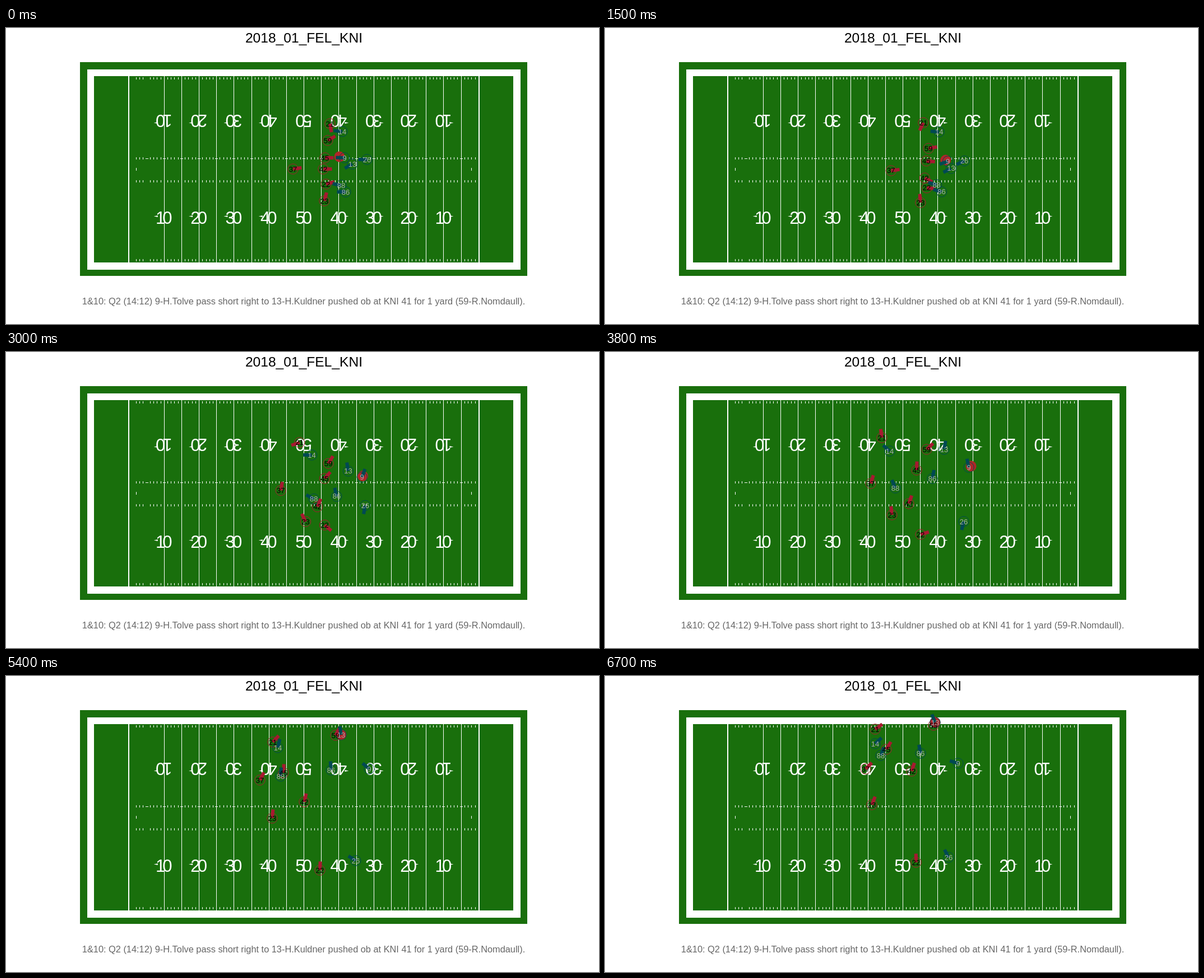
Animation, 1058 px wide and 529 px high, one loop 6800 ms. Source, as an HTML page:

```html
<!DOCTYPE html>
<html lang="en">
<head>
<meta charset="utf-8">
<title>Play diagram</title>
<style>
  html, body { margin: 0; width: 100%; height: 100%; overflow: hidden; background: #fff; }
  svg { display: block; width: 100%; height: 100%; }
  text { font-family: "Liberation Sans", Arial, sans-serif; text-anchor: middle; }
  #title { font-size: 24.6px; }
  #caption { font-size: 16.35px; fill: #666; }
  #field { shape-rendering: crispEdges; }
  #yards { font-size: 31px; fill: #fff; }
  .ring { fill: none; stroke-width: 1; }
  .bar { stroke-width: 6; }
  .num { font-size: 13px; }
  .away { stroke: #a71930; }
  .home { stroke: #004953; }
  .num.away { stroke: none; fill: #000; }
  .num.home { stroke: none; fill: #a5acaf; }
</style>
</head>
<body>
<svg viewBox="0 0 1058 529">
  <text id="title" x="531.5" y="26">2018_01_FEL_KNI</text>
  <g id="field">
    <rect x="132" y="61" width="798" height="382" fill="#196f0c"/>
    <rect x="145" y="74" width="773" height="358" fill="#fff"/>
    <rect x="157" y="86" width="748" height="333" fill="#196f0c"/>
  </g>
  <g id="yards"></g>
  <circle id="ball" r="9.5" fill="#b02628"/>
  <g id="rings"></g>
  <g id="bars"></g>
  <g id="nums"></g>
  <text id="caption" x="531" y="494">1&amp;10: Q2 (14:12) 9-H.Tolve pass short right to 13-H.Kuldner pushed ob at KNI 41 for 1 yard (59-R.Nomdaull).</text>
</svg>
<script>
const LOOP = 6800, STEP = 100;
const YARD = 6.234, MIDFIELD = 531.1;
const byId = id => document.getElementById(id);

function add(parent, tag, attrs, text = '') {
  const el = document.createElementNS('http://www.w3.org/2000/svg', tag);
  for (const key in attrs) el.setAttribute(key, attrs[key]);
  el.textContent = text;
  return byId(parent).appendChild(el);
}

// Field markings
const mark = (x, y, width, height) => add('field', 'rect', { x, y, width, height, fill: '#fff' });
const yardX = yard => MIDFIELD + (yard - 50) * YARD;
const pixelX = yard => Math.round(yardX(yard));

for (let yard = 2; yard < 100; yard++) {
  const x = pixelX(yard);
  if (yard % 5) {
    for (const y of [88, 231, 272, 413]) mark(x, y, 1, 4);
  } else {
    mark(x - 2, 233, 5, 1);
    if (yard > 5) mark(x, 86, 1, 333);
  }
}
for (const yard of [0, 100]) mark(pixelX(yard) - (yard ? 0 : 1), 86, 2, 333);
for (const yard of [2, 98]) mark(pixelX(yard), 250, 1, 5);

for (let yard = 10; yard <= 90; yard += 10) {
  const x = yardX(yard), side = Math.sign(yard - 50);
  const tens = Math.min(yard, 100 - yard) / 10;
  for (const [y, turn] of [[166, 180], [339, 0]]) {
    for (const [digit, shift] of [[tens, -YARD], [0, YARD]]) {
      add('yards', 'text', {
        x: x + shift, y: y + 11, transform: `rotate(${turn} ${x} ${y})`
      }, digit);
    }
    const tip = turn ? 169.5 : 336.5;
    if (side) add('yards', 'path', { d: `M${x + side * 18} ${tip}l${-side * 7} -1.5v3z` });
  }
}

// Each player runs a smooth route through a few points, starting from rest
const KEYS = [0, 2100, 3800, 5400, 6700];
const along = (a, b, u) => a.map((v, i) => v + (b[i] - v) * u);
const ease = (t, from, to) => {
  const u = Math.min(1, Math.max(0, (t - from) / (to - from)));
  return u * u * (3 - 2 * u);
};

function slope(route, i, axis) {
  if (i === 0) return 0;
  const next = Math.min(i + 1, KEYS.length - 1);
  return (route[next][axis] - route[i - 1][axis]) / (KEYS[next] - KEYS[i - 1]);
}
function position({ route }, t) {
  let i = 0;
  while (i < KEYS.length - 2 && t > KEYS[i + 1]) i++;
  const d = KEYS[i + 1] - KEYS[i], u = (t - KEYS[i]) / d, w = 1 - u;
  return [0, 1].map(axis =>
    route[i][axis] * w * w * (1 + 2 * u) + route[i + 1][axis] * u * u * (3 - 2 * u)
    + d * u * w * (slope(route, i, axis) * w - slope(route, i + 1, axis) * u));
}

const players = [];
function player(team, num, stance, ...route) {
  const p = {
    team, route, stance: stance * Math.PI / 180,
    ring: add('rings', 'circle', { class: 'ring ' + team, r: 9.2 }),
    bar: add('bars', 'line', { class: 'bar ' + team, x2: 15.5 }),
    label: add('nums', 'text', { class: 'num ' + team, y: 4.5 }, num)
  };
  players.push(p);
  return p;
}

player('away', 21, 80, [578, 171], [557, 167], [494, 153], [476, 118], [482, 95]);
player('away', 59, -30, [574, 201], [578, 216], [574, 174], [588, 106], [586, 88]);
player('away', 45, 0, [569, 232], [573, 237], [556, 211], [495, 173], [502, 131]);
player('away', 42, 0, [566, 252], [569, 274], [542, 271], [532, 225], [547, 170]);
player('away', 22, -15, [571, 279], [574, 292], [563, 326], [560, 347], [555, 333]);
player('away', 23, -75, [568, 309], [556, 311], [512, 291], [475, 254], [476, 230]);
player('away', 37, -8, [512, 252], [506, 254], [474, 235], [453, 186], [465, 166]);

player('home', 14, 186, [600, 185], [586, 185], [508, 177], [485, 128], [482, 121]);
const passer = player('home', 9, 182, [604, 232], [618, 237], [649, 206], [648, 166], [630, 156]);
const receiver = player('home', 13, 150, [618, 243], [616, 246], [605, 174], [598, 105], [589, 83]);
player('home', 26, 180, [644, 235], [640, 245], [640, 303], [624, 330], [613, 324]);
player('home', 88, 190, [598, 281], [582, 276], [518, 243], [490, 179], [492, 142]);
player('home', 86, 180, [606, 293], [597, 286], [584, 226], [580, 168], [563, 138]);

// The passer holds the ball, throws it in a straight line, then the receiver carries it
const THROW = 4200, CATCH = 5100;
function ballAt(t) {
  if (t > CATCH) return position(receiver, t);
  const held = Math.min(t, THROW), [x, y] = position(passer, held);
  const hands = [x - 9 + held / 290, y - 2];
  return t < THROW ? hands
    : along(hands, position(receiver, CATCH), (t - THROW) / (CATCH - THROW));
}

// Bodies lean between the running direction and the gaze, which turns from the stance to the ball
const PULL = { away: 25, home: 14 };
function heading(p, t, ball) {
  const here = position(p, t), before = position(p, t - 50), after = position(p, t + 50);
  const toBall = here.map((v, i) => ball[i] - v);
  const reach = Math.max(20, Math.hypot(...toBall));
  const stance = [Math.cos(p.stance), Math.sin(p.stance)];
  const watching = p === passer ? 0 : ease(t, 2200, 3800);
  const gaze = along(stance, toBall.map(v => v / reach), watching);
  const [dx, dy] = gaze.map((v, i) => v * PULL[p.team] + (after[i] - before[i]) * 10);
  return Math.atan2(dy, dx) * 180 / Math.PI;
}

function draw(now) {
  const t = Math.floor(now % LOOP / STEP) * STEP;
  const ball = ballAt(t);
  for (const p of players) {
    const place = `translate(${position(p, t)})`;
    p.ring.setAttribute('transform', place);
    p.label.setAttribute('transform', place);
    p.bar.setAttribute('transform', `${place} rotate(${heading(p, t, ball)})`);
  }
  byId('ball').setAttribute('transform', `translate(${ball})`);
}

const start = performance.now();
function tick() {
  draw(performance.now() - start);
  requestAnimationFrame(tick);
}
tick();
</script>
</body>
</html>
```
